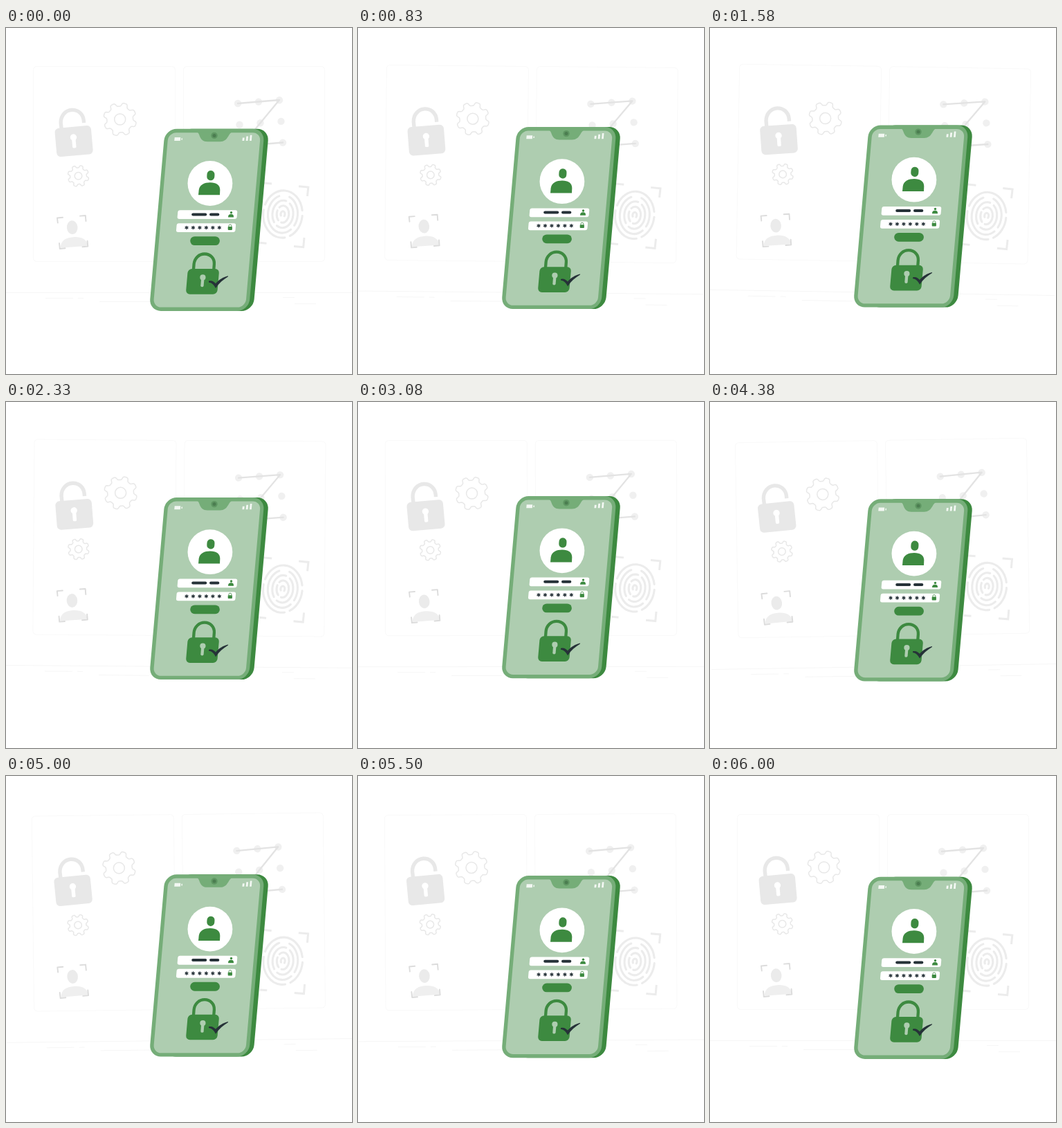
An HTML page for the animation above (6040 ms loop, 500 by 500 pixels).

```html
<!DOCTYPE html>
<html lang="en">
<head>
<meta charset="utf-8">
<title>Phone login</title>
<style>
  html, body { margin: 0; width: 100%; height: 100%; overflow: hidden; background: #fff; }
  svg { display: block; width: 100vw; height: 100vh; }
  .line { fill: none; stroke-linecap: round; stroke-linejoin: round; }
  .dark { fill: #3d8a40; }
  .frame { fill: #75ad78; }
  .screen { fill: #aecdb0; }
  .white { fill: #fff; }
  .ink { fill: #263238; }
</style>
</head>
<body>
<svg viewBox="0 0 500 500">
  <g id="scene">
    <!-- panels and floor -->
    <g fill="none" stroke="#f9f9f9">
      <rect x="39.5" y="55.5" width="205" height="282" rx="5"/>
      <rect x="256.5" y="55.5" width="204" height="282" rx="5"/>
    </g>
    <path d="M0 382.4H500M57 390.5H97M104 390.5H112M135 395.5H208M400 389.5H417M417 398.5H448" stroke="#f6f6f6" fill="none"/>

    <!-- open padlock -->
    <path class="line" d="M80.3 147L79.2 137C79 126.500 86 119 95 118.400C104 118 111.300 124 112.300 133.500L112.600 137" stroke="#e8e8e8" stroke-width="5.4" style="stroke-linecap:butt"/>
    <rect x="71.800" y="142.800" width="52.600" height="41.600" rx="6" fill="#e8e8e8" transform="rotate(-5 98.100 163.600)"/>
    <g class="white" transform="rotate(-5 97.500 158)">
      <circle cx="97.500" cy="158" r="4.700"/>
      <rect x="94.900" y="158" width="5.400" height="15.500" rx="1.800"/>
    </g>

    <g id="gears" fill="none" stroke="#e8e8e8" stroke-width="1.500"></g>

    <!-- face scan -->
    <ellipse cx="95.700" cy="288.200" rx="7.800" ry="9.900" fill="#ebebeb" transform="rotate(-5 95.700 288.200)"/>
    <path d="M78.600 317.800C79 306.500 87 303 97 302.200C108 301.400 116 304.500 119 314.700Z" fill="#efefef"/>
    <path class="line" d="M74.800 281.500L74 274.500L82 273.800M107 271.600L114.800 271L115.500 279M77 311L77.800 319L85.500 318.300M110.500 316.300L118.300 315.600L117.600 307.800" stroke="#dcdcdc" stroke-width="1.900"/>

    <!-- unlock pattern -->
    <g id="dots" fill="#f0f0f0"></g>
    <path class="line" d="M335 109L395 104L340 170.500L400 165.500" stroke="#e3e3e3" stroke-width="2.300"/>

    <!-- fingerprint -->
    <g id="print" class="line" stroke="#ececec" stroke-width="3.100"></g>
    <path d="M423 228.700L436.800 230L435.500 243M431 303L429.700 316.700L416 315.500M370 223.700L384 225M366 310.300L376.500 311.300" fill="none" stroke="#ececec" stroke-width="3"/>
  </g>

  <g id="phone">
    <!-- x shifts with y around y = 277 -->
    <g transform="matrix(1 0 -.0875 1 24.240 0)">
      <rect class="dark" x="240" y="145.700" width="128.700" height="263.200" rx="17"/>
      <rect class="frame" x="218.300" y="145.700" width="144" height="263.200" rx="17"/>
      <rect class="screen" x="223.700" y="151.200" width="133.400" height="252.400" rx="11.500"/>
    </g>
    <path class="frame" d="M276 150.500C281 152 278.500 164.200 291 164.200H309.500C321 164.200 321 152.500 326.500 150.500Z"/>
    <circle cx="301" cy="155.400" r="4.700" fill="#5f9763"/>
    <circle cx="301" cy="155.400" r="2.500" fill="#4b7d50"/>
    <g fill="#f3f8f3">
      <path d="M243.700 158H252.200L251.800 163H243.200ZM253.500 159.200H255L254.800 161.800H253.300Z"/>
      <path d="M341.900 158.500H344.700L344.200 163H341.400ZM347.300 156.500H350.100L349.500 163H346.700ZM352.800 154.800H355.500L354.800 163H352Z"/>
    </g>

    <!-- avatar -->
    <circle class="white" cx="294.900" cy="224.500" r="32.400"/>
    <rect class="dark" x="290.400" y="206" width="11" height="14.300" rx="5.500" transform="rotate(4 296 213)"/>
    <path class="dark" d="M278 241.300L278.700 234C279.800 226.200 287 223.300 295 223.300C304 223.300 309.200 227 309.300 234L309 241.300Z"/>

    <!-- form -->
    <g class="white" transform="matrix(1 0 -.0875 1 24.240 0)">
      <rect x="247.300" y="263.200" width="86" height="12.800" rx="3"/>
      <rect x="247.300" y="282.200" width="85.500" height="12.800" rx="3"/>
    </g>
    <rect class="ink" x="268.200" y="267.400" width="22" height="4" rx="2"/>
    <rect class="ink" x="294" y="267.400" width="14.300" height="4" rx="2"/>
    <circle class="dark" cx="325.500" cy="266.800" r="1.700"/>
    <path class="dark" d="M321 273.500C321 270.300 322.500 269.100 325.200 269.100C328 269.100 329.200 270.500 329 273.500Z"/>
    <g id="stars" stroke="#263238" stroke-width="1.300" stroke-linecap="round"></g>
    <rect class="dark" x="320.700" y="287" width="6.200" height="4.900" rx=".8"/>
    <path d="M321.900 287.500V286A2 2 0 0 1 325.900 286V287.500" fill="none" stroke="#3d8a40" stroke-width=".8"/>
    <rect class="dark" x="266.200" y="301.200" width="42.700" height="12.800" rx="6.400"/>

    <!-- closed padlock -->
    <path d="M270.900 350L271.600 341C272.500 332.500 279 326.500 287 326.500C295.500 326.500 301.400 333 300.900 341L300.200 350" fill="none" stroke="#3d8a40" stroke-width="4.300"/>
    <rect class="dark" x="261.300" y="348" width="45.400" height="36.700" rx="6" transform="matrix(1 0 -.0875 1 32.060 0)"/>
    <circle class="screen" cx="284.400" cy="360.400" r="4.100"/>
    <path class="screen" d="M282.200 361H286.600L285.600 372.500Q285.400 374.200 283.500 374.200Q281.200 374.200 281.300 372.300Z"/>
    <path class="ink" d="M293 365.700C297.500 364.400 300.600 366.600 303 369.200C307.500 364 313.500 360 321 358.300V359.300C314 363.500 307.500 369 303 376C300.800 371.500 298 368.300 293 367.400Z"/>
  </g>
</svg>
<script>
  const NS = 'http://www.w3.org/2000/svg';
  const byId = id => document.getElementById(id);

  function add(parent, tag, attrs) {
    const node = document.createElementNS(NS, tag);
    for (const key in attrs) node.setAttribute(key, attrs[key]);
    byId(parent).appendChild(node);
  }

  function gear(cx, cy, mid, tooth, hole) {
    const points = [];
    for (let i = 0; i < 192; i++) {
      const a = i / 192 * Math.PI * 2;
      const wave = Math.cos(8 * (a - 0.31));
      const r = mid + tooth * Math.tanh(2.2 * wave);
      points.push((cx + r * Math.cos(a)).toFixed(2) + ',' + (cy + r * Math.sin(a)).toFixed(2));
    }
    add('gears', 'polygon', { points: points.join(' '), 'stroke-linejoin': 'round' });
    add('gears', 'circle', { cx, cy, r: hole });
  }
  gear(164.7, 132, 21.4, 2.6, 8);
  gear(104.5, 213.8, 13.6, 1.8, 5.3);

  for (let row = 0; row < 3; row++)
    for (let col = 0; col < 3; col++)
      add('dots', 'circle', { cx: 335 + 30 * col + 2.5 * row, cy: 109 - 2.4 * col + 30.7 * row, r: 5.2 });

  // rx, ry, dash pattern in percent of the ring, start
  const rings = [
    [28.3, 34.2, '18 4 30 4 40 4', 0],
    [21.5, 27.2, '30 5 55 10', 20],
    [15, 19.8, '40 6 48 6', 62],
    [8.8, 12.3, '62 8 22 8', 35],
    [3, 4.2, '72 28', 60]
  ];
  for (const [rx, ry, dash, start] of rings)
    add('print', 'ellipse', {
      cx: 400, cy: 269, rx, ry, pathLength: 100,
      'stroke-dasharray': dash, 'stroke-dashoffset': start, transform: 'rotate(5 400 269)'
    });

  for (let i = 0; i < 6; i++)
    for (const turn of [5, 65, 125])
      add('stars', 'path', { d: 'M0-2.200V2.200', transform: `translate(${261 + 9.47 * i} 288.500) rotate(${turn})` });

  const LOOP = 6040, STEPS = 144;
  const lerp = (a, b, p) => a + (b - a) * p;

  // piecewise linear track of [phase, value] stops
  function track(stops, p) {
    const i = Math.max(1, stops.findIndex(s => s[0] >= p));
    const [p0, v0] = stops[i - 1], [p1, v1] = stops[i];
    return lerp(v0, v1, (p - p0) / (p1 - p0));
  }
  const FLOAT = [[0, 0], [0.5, -10], [1, 0]];
  const SWAY = [[0, 0], [0.25, 1], [0.75, -1], [1, 0]];

  // 24 steps per second, starting on 10 ms ticks
  function draw(ms) {
    const tick = Math.floor((ms % LOOP) / 10) * 10;
    const p = Math.min(STEPS, Math.floor((tick + 4.99) * 0.024)) / STEPS;
    byId('phone').setAttribute('transform', `translate(0 ${track(FLOAT, p)})`);
    byId('scene').setAttribute('transform', `rotate(${track(SWAY, p)} 250 250)`);
  }

  const begin = performance.now();
  function loop() {
    draw(performance.now() - begin);
    requestAnimationFrame(loop);
  }
  loop();
</script>
</body>
</html>
```
